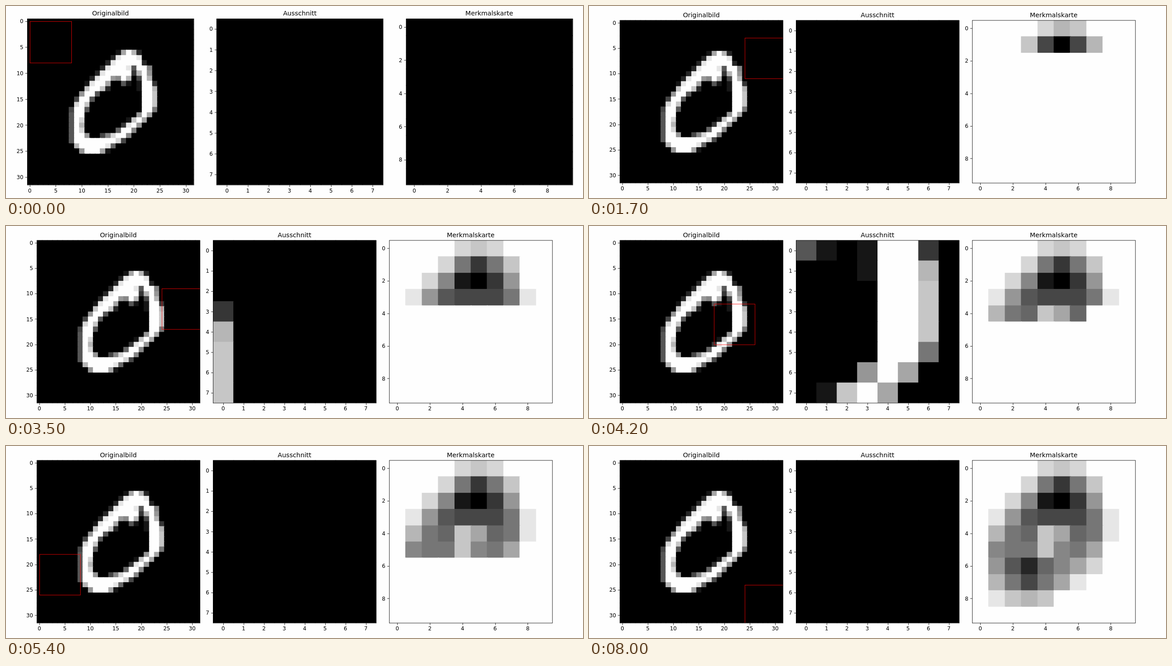
Write an HTML page with a canvas that moves like this. It is 1280 by 427 pixels and loops after 8100 ms.

```html
<!DOCTYPE html>
<html lang="de">
<head>
<meta charset="utf-8">
<title>Faltung</title>
<style>
  html, body { margin: 0; width: 100%; height: 100%; overflow: hidden; background: #fefefe; }
  canvas { display: block; }
</style>
</head>
<body>
<canvas id="stage" width="1280" height="427"></canvas>
<script>
const ctx = document.getElementById('stage').getContext('2d');

const GRID = 32, WINDOW = 8, STRIDE = 3, STEPS = 9, MAP = 10;
const STEP_MS = 100;

// The figure is laid out 1500 units wide and scaled down to the stage.
const WIDTH = 1500, HEIGHT = 501;
const SCALE = 1280 / WIDTH;
const POINT = 100 / 72;
const TICK = 3.5 * POINT, TICK_PAD = 7 * POINT, TITLE_PAD = 6 * POINT;
const font = points => `${points * POINT}px "DejaVu Sans", sans-serif`;

// The first step uses a wider layout than all later ones.
const WIDE = { x: 55, y: 33, size: 433, pitch: 492.4 };
const TIGHT = { x: 80, y: 37, size: 424, pitch: 458 };

// Contours of the digit on the 32 x 32 grid
const OUTLINE = `M19 6 17.4 7 12.4 12 10 15 8.67 17.4 8.67 24 11 26 14 26 15.5 25
  19 23 24.2 18 24.77 17 24.77 13.3 23.7 11.7 23.5 9 22.3 9 21.8 7 20 6Z`;
const HOLE = `M19.7 9 20.5 9 21.9 11.8 22 18 17 22 13.3 23.1 12.2 22.9 10.9 22
  10.65 20.5 11.1 18 12.2 15.6 13.3 14.4 15.3 13.4 15.8 12.1 17.3 11.1
  18 12.4 19.2 12.3 20.1 11 20.4 10Z`;

const makeGrid = (n, fn) =>
  Array.from({ length: n }, (_, y) => Array.from({ length: n }, (_, x) => fn(x, y)));

// Share of each grid cell that the digit covers
function rasterise(path) {
  const fine = 16;
  const pen = new OffscreenCanvas(GRID * fine, GRID * fine)
    .getContext('2d', { willReadFrequently: true });
  pen.scale(fine, fine);
  pen.fill(new Path2D(path), 'evenodd');
  return makeGrid(GRID, (x, y) => {
    const { data } = pen.getImageData(x * fine, y * fine, fine, fine);
    let sum = 0;
    for (let i = 3; i < data.length; i += 4) sum += data[i];
    return sum / (255 * fine * fine);
  });
}

const digit = rasterise(OUTLINE + HOLE);

const crop = (col, row) =>
  makeGrid(WINDOW, (x, y) => (digit[row * STRIDE + y] || [])[col * STRIDE + x] || 0);

const sums = makeGrid(STEPS, (col, row) =>
  crop(col, row).flat().reduce((a, b) => a + b, 0));

// Feature map after the given step, scaled so that the strongest response is black
function featureMap(step) {
  const raw = makeGrid(MAP, (x, y) =>
    x < STEPS && y < STEPS && y * STEPS + x <= step ? sums[y][x] : 0);
  const max = Math.max(...raw.flat());
  return raw.map(line => line.map(v => max ? 1 - v / max : 0));
}

// Sixteen shades of grey
function shade(v) {
  const bin = Math.floor(v * 255 / 16);
  const g = bin <= 0 ? 0 : bin >= 15 ? 254 : bin * 16 + 6;
  return `rgb(${g},${g},${g})`;
}

const snap = v => Math.round(v) + 0.5;

function strokeBox(x, y, size) {
  const left = snap(x), top = snap(y);
  ctx.strokeRect(left, top, snap(x + size) - left, snap(y + size) - top);
}

// Each cell reaches one unit under its neighbours, so no seams show.
function drawCells(cells, x, y, size) {
  const unit = size / cells.length;
  cells.forEach((line, r) => line.forEach((v, c) => {
    ctx.fillStyle = shade(v);
    ctx.fillRect(Math.round(x + c * unit), Math.round(y + r * unit), unit + 2, unit + 2);
  }));
}

function drawWindow(col, row, x, y, size) {
  const unit = size / GRID;
  ctx.strokeStyle = '#f00';
  strokeBox(x + (col * STRIDE + 0.5) * unit, y + (row * STRIDE + 0.5) * unit, WINDOW * unit);
}

function drawAxes(title, n, tickStep, x, y, size) {
  ctx.strokeStyle = ctx.fillStyle = '#000';
  strokeBox(x, y, size);

  ctx.font = font(10);
  ctx.beginPath();
  for (let i = 0; i < n; i += tickStep) {
    const at = (i + 0.5) * size / n;
    ctx.moveTo(snap(x + at), y + size);
    ctx.lineTo(snap(x + at), y + size + 1 + TICK);
    ctx.moveTo(x, snap(y + at));
    ctx.lineTo(x - TICK, snap(y + at));
    ctx.textAlign = 'center';
    ctx.fillText(i, x + at, Math.round(y + size + TICK_PAD + 10.5));
    ctx.textAlign = 'right';
    ctx.fillText(i, x - TICK_PAD, Math.round(y + at + 5.2));
  }
  ctx.stroke();

  ctx.font = font(12);
  ctx.textAlign = 'center';
  ctx.fillText(title, x + size / 2, Math.round(y - TITLE_PAD));
}

function drawPanel(index, layout, title, cells, tickStep, overlay) {
  const { y, size } = layout;
  const x = layout.x + index * layout.pitch;
  ctx.save();
  ctx.beginPath();
  ctx.rect(x, y, size, size);
  ctx.clip();
  drawCells(cells, x, y, size);
  if (overlay) overlay(x, y, size);
  ctx.restore();
  drawAxes(title, cells.length, tickStep, x, y, size);
}

function render(step) {
  const layout = step === 0 ? WIDE : TIGHT;
  const col = step % STEPS, row = Math.floor(step / STEPS);
  ctx.setTransform(SCALE, 0, 0, SCALE, 0, 0);
  ctx.lineWidth = 1;
  ctx.fillStyle = '#fefefe';
  ctx.fillRect(0, 0, WIDTH, HEIGHT);

  drawPanel(0, layout, 'Originalbild', digit, 5,
    (x, y, size) => drawWindow(col, row, x, y, size));
  drawPanel(1, layout, 'Ausschnitt', crop(col, row), 1);
  drawPanel(2, layout, 'Merkmalskarte', featureMap(step), 2);
}

const start = performance.now();
function tick() {
  const elapsed = Math.max(0, performance.now() - start);
  render(Math.floor(elapsed / STEP_MS) % (STEPS * STEPS));
  requestAnimationFrame(tick);
}
tick();
</script>
</body>
</html>
```
